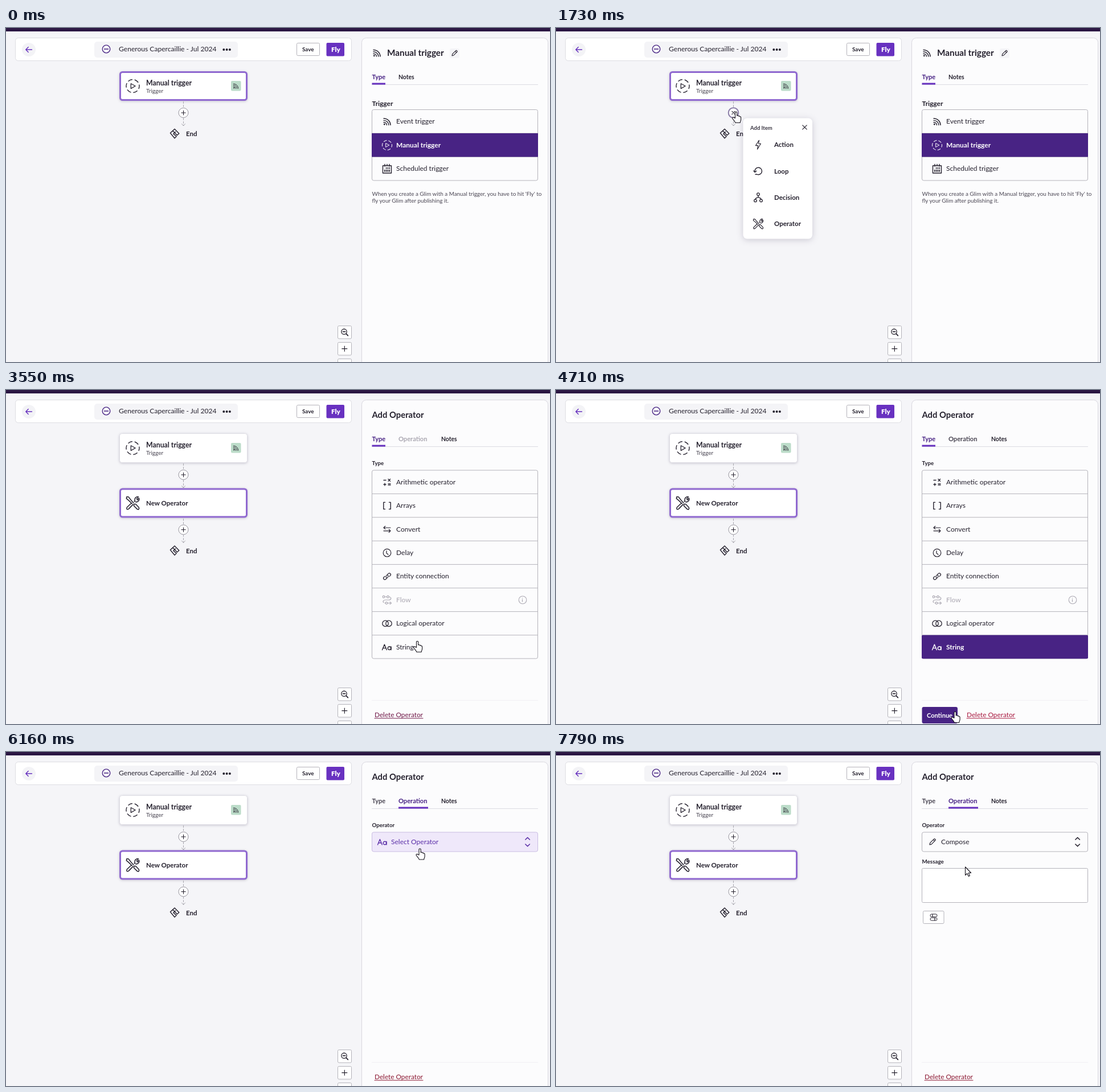
Recreate the animation shown at these times as an HTML page. Size 955x587 px, loop 8 s.

```html
<!DOCTYPE html>
<html lang="en">
<head>
<meta charset="utf-8">
<title>Flow builder</title>
<style>
  html, body { margin: 0; width: 100%; height: 100%; overflow: hidden; background: #f5f5f8; }
  svg { display: block; width: 955px; height: 587px; font-family: Lato, "Open Sans", sans-serif; }
  text { white-space: pre; }
  .lift { filter: drop-shadow(0 1px 2px rgba(40, 30, 70, .22)); }
  .float { filter: drop-shadow(0 2px 6px rgba(40, 30, 70, .2)); }
</style>
</head>
<body>
<svg id="stage" viewBox="0 0 955 587"></svg>
<script>
const INK = '#25212e', DEEP = '#482384', PURPLE = '#6630be', TINT = '#efe8fa', GREY = '#b4b3ba', PALE = '#aba8b2';
const LOOP = 8000;

// ---- drawing helpers ----
const text = (x, y, s, size = 12, o = {}) =>
  `<text x="${x}" y="${y}" font-size="${size}" font-weight="${o.w || 400}" fill="${o.c || INK}">${s}</text>`;
const bold = (x, y, s, size = 11.5, c = INK) => text(x, y, s, size, { w: 700, c });
const rect = (x, y, x2, y2, fill, stroke = 'none', r = 2, more = '') =>
  `<rect x="${x}" y="${y}" width="${x2 - x}" height="${y2 - y}" rx="${r}" fill="${fill}" stroke="${stroke}" ${more}/>`;
const path = (d, c = INK, w = 1.3, fill = 'none') =>
  `<path d="${d}" fill="${fill}" stroke="${c}" stroke-width="${w}" stroke-linecap="round" stroke-linejoin="round"/>`;
const ring = (x, y, r, c = INK, w = 1.3, fill = 'none', more = '') =>
  `<circle cx="${x}" cy="${y}" r="${r}" fill="${fill}" stroke="${c}" stroke-width="${w}" ${more}/>`;
const at = (x, y, s, k = 1) => `<g transform="translate(${x} ${y}) scale(${k})">${s}</g>`;
const group = (id, s, cls = '') => `<g id="${id}" class="${cls}">${s}</g>`;

// ---- icons, centred on 0,0 ----
const icon = {
  rss: c => path('M-6-5.5C1-5.5 6 0 6 6M-6-2.2C-1-2.2 2.8 1.6 2.8 6M-6 1.2C-3 1.2-.6 3.2-.6 6', c, 1.4) + ring(-4.7, 4.7, 1, c, 1, c),
  play: c => ring(0, 0, 11.5, c, 1.4, 'none', 'stroke-dasharray="8 4.04" stroke-dashoffset="3"') + path('M-3.2-4.2V4.4L4.6 0Z', c, 1.3),
  calendar: c => path('M-7.5-5.5H7.5V7.5H-7.5ZM-4-8V-4.5M4-8V-4.5M0-8V-5.5', c, 1.4) +
    path('M-4.2 4.6V2M-1.4 4.6V2M1.4 4.6V2M4.2 4.6V2M-1.4-.6V-2M1.4-.6V-2M4.2-.6V-2', c, 1.6),
  pencil: c => path('M-5 5-4.2 1.6 2.6-5.2C3.6-6.2 6-3.8 5-2.8L-1.8 4.1ZM1.2-3.8 3.7-1.3', c, 1.2),
  math: c => path('M-6-3.5H-2M2-5.5 5.6-1.6M5.6-5.5 2-1.6M-6 4H-2M-4 2V6M2 3H6M2 5.2H6', c, 1.3),
  arrays: c => path('M-3.5-6H-6.2V6H-3.5M3.5-6H6.2V6H3.5', c, 1.4),
  convert: c => path('M-6-2.8H6M-3.2-5.5-6-2.8-3.2-.2M6 2.8H-6M3.2.2 6 2.8 3.2 5.5', c, 1.2),
  clock: c => ring(0, 0, 6.8, c, 1.2) + path('M-1-3.5V.5L2 3', c, 1.2),
  link: c => path('M-1 2.4C-3 .6-2-.6-.4-2.3L2.2-4.9C4.6-7.2 8-3.8 5.6-1.4L3.9.3M1-2.4C3-.6 2 .6.4 2.3L-2.2 4.9C-4.6 7.2-8 3.8-5.6 1.4L-3.9-.3', c, 1.2),
  flow: c => path('M-4.6-5.5H3C8-5.5 8 0 3 0H-3M1-5.5H-2M-4 5.5H5M-3 0C-7 0-8 3-6 4.5M5 3.5 7.5 5.5 5 7.5', c, 1.2) +
    ring(-6, -5.5, 1.8, c, 1.2, '#fcfcfd') + ring(1.5, -5.5, 1.8, c, 1.2, '#fcfcfd') + ring(-1, 5.5, 1.8, c, 1.2, '#fcfcfd'),
  logic: c => ring(-3, 0, 5.2, c) + ring(3, 0, 5.2, c),
  letters: c => path('M-8.5 5-4.6-4.6-.8 5M-7.2 1.8H-2', c, 1.4) + ring(4, 2, 2.8, c, 1.4) + path('M7-.9V5', c, 1.4),
  bolt: c => path('M1.5-8-4.5 1.4H-.3L-1.5 8 4.5-2H.6Z', c, 1.1),
  loop: c => path('M-5.8 1.5A6.2 6.2 0 1 1-2 5.8M-8.2-.6-5.8 2-3.2-.2M-2 5.8H-5', c, 1.4),
  tree: c => ring(0, -5.6, 2.3, c) + ring(-5, 5.6, 2.3, c) + ring(5, 5.6, 2.3, c) + path('M0-3.2V-1C0 1-5 0-5 3.2M0-1C0 1 5 0 5 3.2', c),
  tools: c => path('M-8-8.5-5.5-8-3-4.6 1 0M-8-8.5-8.6-6-5.2-3.2-1 1M2 1.5 4 1.6 8.2 6C9.4 8 7.6 9.6 6 8.4L1.6 4V2ZM-1.8.2-7.8 6C-9 8.2-7.6 9.4-5.6 8.2L.2 2.2M2-2 3-3.2C2-6.4 5-9.2 7.6-8.2L5.4-5.8 6.2-4 8.4-6.4C9.6-3.2 6-.4 3.6-1.6', c, 1.2),
  end: c => path('M-7.6-1 0-8 7.8 0 4.4 3-3.2-4.8-7.6-1 0 8.2 3.2 5-2.2.4 1.6-3', c, 1.4)
};
const put = (name, x, y, c = INK, k = 1) => at(x, y, icon[name](c), k);

// ---- canvas parts ----
const edge = (y1, y2) => `<path d="M311.5 ${y1}V${y2}" stroke="#a9a8af" stroke-dasharray="4 2" fill="none"/>`;
const tip = y => path(`M308.5 ${y - 3.5} 311.5 ${y} 314.5 ${y - 3.5}`, '#a9a8af', 1);
const plusMark = path('M-3.7 0H3.7M0-3.7V3.7', INK, 1.1);
const plus = y => at(311.5, y, ring(0, 0, 8.5, '#96949d', 1, '#fff') + plusMark);
const endMark = y => put('end', 296, y) + bold(316, y + 4.5, 'End');
const card = (y, sel) => sel
  ? rect(200.5, y + 1.5, 422.5, y + 50.5, '#fff', '#9069d0', 4, 'stroke-width="3" class="lift"')
  : rect(199.5, y + .5, 423.5, y + 51.5, '#fff', '#dedde4', 4, 'class="lift"');
const zoomBox = (y, s) => rect(582.5, y, 606.5, y + 22.5, '#fff', GREY) + at(594.3, y + 11.2, s);

const frame = rect(-1, -1, 956, 6, '#2b1743', 'none', 0) +
  rect(16.5, 17.5, 606.5, 57.5, '#fff', '#dddde2', 5) +
  ring(40, 38, 12, 'none', 0, '#f3f3f6') + path('M45.5 38H35M39.2 33.5 34.8 38 39.2 42.5', PURPLE, 1.4) +
  rect(155, 24, 407, 52, '#f4f4f7', 'none', 5) +
  ring(176, 37, 6.8, DEEP, 1.3) + path('M172.5 37H179.5', DEEP, 1.3) +
  text(198, 41.3, 'Generous Capercaillie - Jul 2024', 12.1) +
  [382.3, 387.6, 392.9].map(x => ring(x, 38, 2, 'none', 0, INK)).join('') +
  rect(510.5, 26.5, 550.5, 48.5, '#fff', GREY) + bold(520, 41.2, 'Save', 9.9) +
  rect(562.5, 26, 594, 49.5, '#6831c0') + text(571, 42.3, 'Fly', 11.6, { w: 900, c: '#fff' }) +
  zoomBox(523.5, ring(-.8, -1, 4.7, INK, 1.3) + path('M2.8 2.6 6 6', INK, 1.8) + path('M-2.6-1H-2.4M-.8-1H-.6M1-1H1.2', INK, 1.8)) +
  zoomBox(552.5, path('M-4.5 0H4.5M0-4.5V4.5', INK, 1.2)) + zoomBox(581.5, '');

const trigger = put('play', 222.5, 102) + bold(246, 101.2, 'Manual trigger', 12.3) + text(246, 114.2, 'Trigger', 10, { c: '#4a4653' }) +
  rect(395, 93, 412.5, 110.5, '#bcdcc9') + put('rss', 403.5, 102, INK, .7);

const canvas = group('cardOn', card(76, true)) + group('cardOff', card(76, false)) + trigger + edge(129, 140) +
  group('oldEnd', edge(158, 172) + tip(172) + endMark(185.5)) +
  group('operator', edge(158, 172) + tip(172) + card(172.5, true) + put('tools', 222.5, 198.5, INK, 1.3) +
    bold(246, 202.6, 'New Operator') + edge(226, 237) + plus(245.5) + edge(254, 268) + tip(268.5) + endMark(282)) +
  plus(149) + group('hot', ring(311.5, 149, 8.8, '#8b7ea8', 2, '#fff') + group('cross', plusMark));

const menu = group('menu',
  rect(328.5, 158.5, 450, 370.5, '#fff', 'none', 7, 'class="float"') +
  bold(341, 178.8, 'Add Item', 9.5, '#3a3642') + path('M432.8 170.8 440.2 178.2M440.2 170.8 432.8 178.2', INK, 1.2) +
  group('menuHover', rect(335, 321, 444, 367, TINT, 'none', 4)) +
  ['Action bolt', 'Loop loop', 'Decision tree', 'Operator tools'].map((s, i) => {
    const [name, pic] = s.split(' '), y = 205.2 + i * 46.3;
    return put(pic, 355, y) + bold(383, y + 4.2, name, 11.5);
  }).join(''));

// ---- side panel parts ----
const tabLine = path('M642.5 99.5H933.5', '#dcdbe2', 1);
const underline = (x, x2) => rect(x, 96.5, x2, 99.5, PURPLE, 'none', 0);
const list = (y, y2, rows, step, picked) => {
  const line = rows.map((_, i) => i ? path(`M643 ${y + i * step}H933.5`, GREY, 1) : '').join('');
  return rect(642.5, y, 933.5, y2, '#fcfcfd', GREY, 3) + line + rows.map(([name, pic, k = 1], i) => {
    const mid = y + (i + .5) * step - .2, on = i === picked, c = on ? '#fff' : name === 'Flow' ? PALE : INK;
    return (on ? rect(642, y + i * step, 934, y + (i + 1) * step, DEEP, 'none', i === rows.length - 1 ? 2 : 0) : '') +
      put(pic, 669, mid + .5, c, k) + text(685, mid + 4.2, name, 12, { c, w: on ? 700 : 400 });
  }).join('');
};
const types = [['Arithmetic operator', 'math'], ['Arrays', 'arrays'], ['Convert', 'convert'], ['Delay', 'clock'],
  ['Entity connection', 'link'], ['Flow', 'flow'], ['Logical operator', 'logic'], ['String', 'letters']];
const info = ring(907, 369, 6.8, PALE, 1.1) + path('M906.5 368.2V372M906.5 365.6V365.8', PALE, 1.2);
const typeList = pick => bold(642.5, 132, 'Type', 9.6) + list(141, 472, types, 41.4, pick) + info;
const remove = (x, c) => text(x, 575, 'Delete Operator', 11.8, { c }) + path(`M${x} 577H${x + 85}`, c, 1);
const field = (c, fill, edgeColor, pic, label) => rect(642.5, 141, 933.5, 175, fill, edgeColor, 3) +
  put(pic, 661, 158, c) + text(676, 162, label, 12, { c }) + path('M911.8 154 915.6 150.4 919.4 154M911.8 162 915.6 165.6 919.4 162', c, 1.5);
const tab = { type: c => bold(642.5, 90, 'Type', 11, c), op: c => bold(689, 90, 'Operation', 11.1, c) };

const panel = rect(624.5, 17.5, 951.5, 640, '#fcfcfd', '#d9d8df', 8) + tabLine +
  group('start',
    put('rss', 651, 44) + bold(669, 49.3, 'Manual trigger', 15.3) + rect(779, 36, 796, 53, '#f4f4f7', 'none', 3) + put('pencil', 787.5, 44.3, INK, .9) +
    tab.type(DEEP) + bold(689, 90, 'Notes', 10.4) + underline(642.5, 666) + bold(642.5, 136.6, 'Trigger', 12) +
    list(143.5, 268, [['Event trigger', 'rss'], ['Manual trigger', 'play', .74], ['Scheduled trigger', 'calendar']], 41.5, 1) +
    text(642.5, 294.5, "When you create a Glim with a Manual trigger, you have to hit 'Fly' to", 9.85, { c: '#4a4653' }) +
    text(642.5, 306.5, 'fly your Glim after publishing it.', 9.85, { c: '#4a4653' })) +
  group('adding', bold(642.5, 48.8, 'Add Operator', 14.8) + bold(764, 90, 'Notes', 10.4) + path('M642.5 545.5H933.5', '#f1f0f4', 1)) +
  group('pickType', tab.type(DEEP) + tab.op(PALE) + underline(642.5, 666) + typeList(-1) + remove(647, '#701848')) +
  group('picked', tab.type(DEEP) + tab.op('#4a4653') + underline(642.5, 666) + typeList(7) +
    rect(642.5, 557, 705, 586, DEEP, 'none', 3) + bold(651, 575.8, 'Continue', 11, '#fff') + remove(721, '#a8183f')) +
  group('operation', tab.type('#4a4653') + tab.op(DEEP) + underline(689, 741) + bold(642.5, 132, 'Operator', 9.7) + remove(647, '#8c1832')) +
  group('idle', field(INK, '#fcfcfd', GREY, 'letters', 'Select Operator')) +
  group('hover', field('#5b2fa8', TINT, '#c9bce2', 'letters', 'Select Operator')) +
  group('filled', field(INK, '#fcfcfd', GREY, 'pencil', 'Compose') + bold(642.5, 195.5, 'Message', 9.8) +
    rect(642.5, 204.5, 933.5, 264.5, '#fff', GREY) + rect(644.5, 279.5, 681, 301.5, '#fff', GREY) +
    at(663, 290.5, rect(-6, -5.6, 6, -.8, 'none', INK, 2.4) + rect(-6, .8, 6, 5.6, 'none', INK, 2.4) + path('M-2-5V-1M2 1.2V5.2', INK, 1.2))) +
  group('options', rect(642.5, 179, 933.5, 286, '#fff', '#dcdbe2', 3, 'class="lift"') +
    group('optionHover', rect(643, 180, 933, 215, TINT)) +
    ['Compose', 'Replace', 'Split'].map((s, i) => text(676, 201.5 + i * 35.5, s)).join(''));

const pointer = (id, d) => group(id, path(d, '#17141d', 1.1, '#fff'));
const cursor = group('cursor',
  pointer('arrow', 'M.5.5V15L3.8 12 6.2 17 8.4 16 6.2 11H10.6Z') +
  pointer('hand', 'M-1.5 11.5V1.8C-1.5 0 1.7 0 1.7 1.8V7.2C1.9 6.4 4.2 6.4 4.4 8 4.8 7.2 6.6 7.5 6.8 9 7.4 8.4 8.6 8.9 8.6 10V14C8.6 16 7.2 17 7.2 19.5H-1.2C-1.2 17.5-6.5 13-6.5 11.2-6.5 9.6-4.4 9.6-3.4 10.6Z') +
  pointer('move', 'M0-9.5 4-5.5H1.4V-1.4H5.5V-4L9.5 0 5.5 4V1.4H1.4V5.5H4L0 9.5-4 5.5H-1.4V1.4H-5.5V4L-9.5 0-5.5-4V-1.4H-1.4V-5.5H-4Z'));

document.getElementById('stage').innerHTML = frame + canvas + menu + panel + cursor;

// ---- timeline: id, from, to, fade in, fade out ----
const spans = [
  ['cardOn', 0, 2650], ['cardOff', 2650, LOOP], ['oldEnd', 0, 2650], ['operator', 2880, LOOP, 130],
  ['hot', 1460, 2560], ['menu', 1600, 2600, 130, 70], ['menuHover', 2270, 2600],
  ['start', 0, 2650], ['adding', 2650, LOOP], ['pickType', 2650, 3740], ['picked', 3740, 4960],
  ['operation', 4960, LOOP], ['idle', 4960, 6060], ['hover', 6060, 7540], ['filled', 7540, LOOP],
  ['options', 6300, 7600, 190, 70], ['optionHover', 7340, 7600], ['cursor', 180, LOOP]
];
const moves = [[180, 790, 494], [320, 356, 223], [650, 356, 223], [1260, 316, 147], [1990, 316, 147], [2340, 398, 347],
  [2830, 398, 347], [3500, 722, 441], [4500, 722, 441], [4700, 700.5, 565], [5460, 700.5, 565], [6150, 726.5, 169.5],
  [7230, 726.5, 169.5], [7480, 718, 201.5], [LOOP, 718, 201.5]];
const shapes = [[0, 'arrow'], [230, 'move'], [1190, 'hand'], [2570, 'move'], [3200, 'hand'], [4560, 'arrow'],
  [4650, 'hand'], [5530, 'arrow'], [6060, 'hand'], [7560, 'arrow']];

const el = Object.fromEntries([...document.querySelectorAll('#stage g[id]')].map(g => [g.id, g]));
const clamp = v => Math.max(0, Math.min(1, v));
const ease = v => v * v * (3 - 2 * v);

function draw(t) {
  for (const [id, from, to, fadeIn, fadeOut] of spans) {
    const on = t >= from && t < to;
    el[id].style.display = on ? '' : 'none';
    if (on && fadeIn) el[id].style.opacity = Math.min(clamp((t - from) / fadeIn), fadeOut ? clamp((to - t) / fadeOut) : 1);
  }
  el.cross.setAttribute('transform', `translate(311.5 149) rotate(${45 * clamp((t - 1600) / 130)})`);

  const i = Math.max(1, moves.findIndex(m => m[0] > t));
  const [t0, x0, y0] = moves[i - 1], [t1, x1, y1] = moves[i], k = ease(clamp((t - t0) / (t1 - t0)));
  el.cursor.setAttribute('transform', `translate(${x0 + (x1 - x0) * k} ${y0 + (y1 - y0) * k})`);
  const kind = shapes.filter(s => s[0] <= t).pop()[1];
  for (const id of ['arrow', 'hand', 'move']) el[id].style.display = id === kind ? '' : 'none';
}

const begin = performance.now();
function tick() {
  draw((performance.now() - begin) % LOOP);
  requestAnimationFrame(tick);
}
tick();
</script>
</body>
</html>
```
